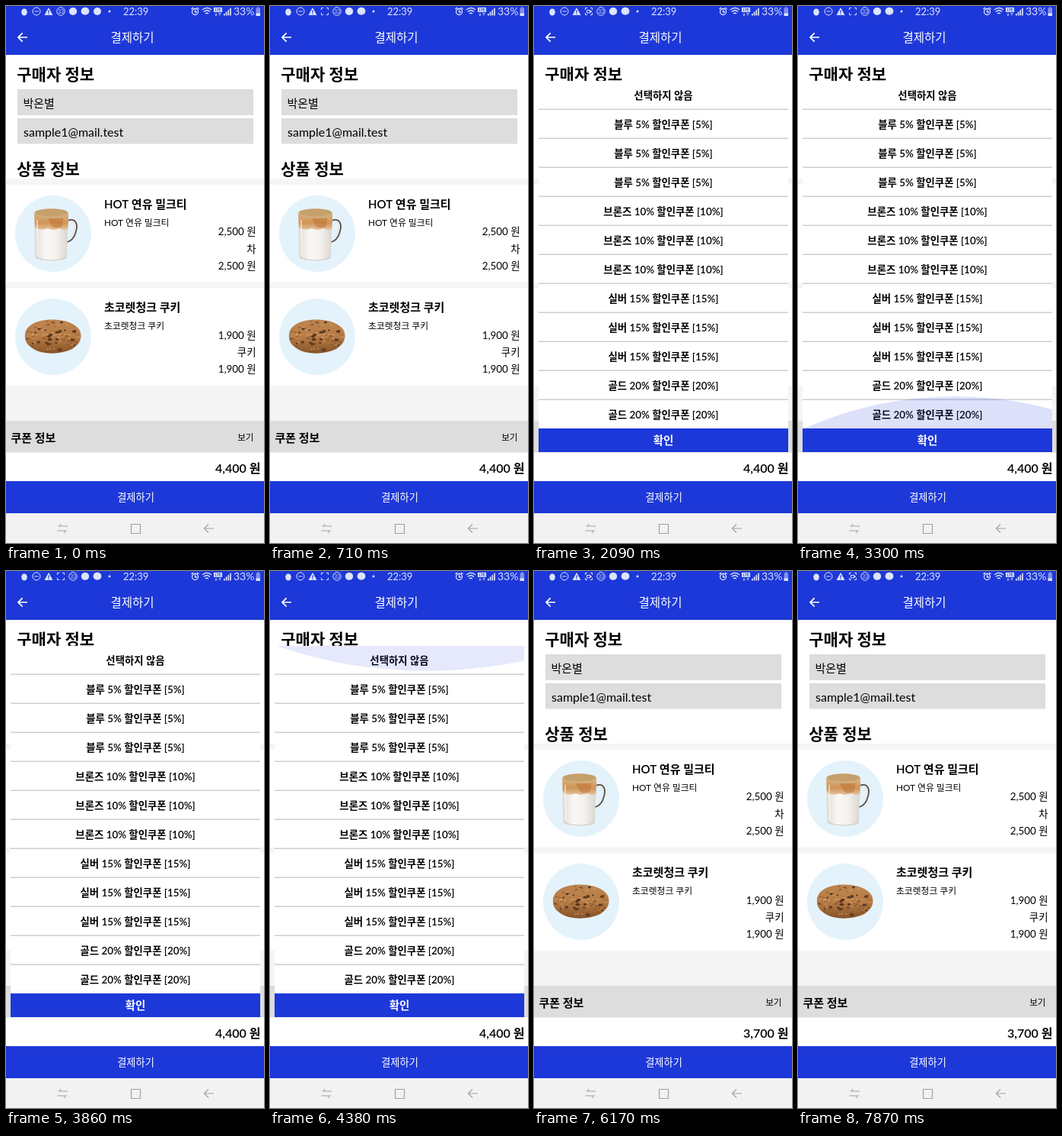
Write an HTML page with a canvas that moves like this. It is 339 by 703 pixels and loops after 8 s.

```html
<!DOCTYPE html>
<html lang="ko">
<head>
<meta charset="utf-8">
<style>
html, body { margin: 0; width: 100%; height: 100%; overflow: hidden; background: #fff; }
canvas { display: block; width: 339px; height: 703px; }
</style>
</head>
<body>
<canvas id="stage" width="339" height="703"></canvas>
<script>
const ctx = document.getElementById('stage').getContext('2d');
const LOOP = 8000;
const BLUE = '#1d38d8', STATUS = '#dde4ff', GREY = '#dddddd', PALE = '#f5f5f5';
const FONT = 'Lato, "Noto Sans CJK KR", "Noto Sans CJK", sans-serif';
const MODAL = { x: 6, y: 98, w: 328, h: 455, open: 2090, close: 5030 };
const COUPONS = ['선택하지 않음',
  ...Array(3).fill('블루 5% 할인쿠폰 [5%]'),
  ...Array(3).fill('브론즈 10% 할인쿠폰 [10%]'),
  ...Array(3).fill('실버 15% 할인쿠폰 [15%]'),
  ...Array(2).fill('골드 20% 할인쿠폰 [20%]')];

const clamp = v => Math.max(0, Math.min(1, v));
const easeOut = v => 1 - (1 - clamp(v)) ** 2;

function rect(x, y, w, h, color) {
  ctx.fillStyle = color;
  ctx.fillRect(x, y, w, h);
}

function ellipse(x, y, rx, ry, color) {
  ctx.fillStyle = color;
  ctx.beginPath();
  ctx.ellipse(x, y, rx, ry, 0, 0, Math.PI * 2);
  ctx.fill();
}

function path(d, color, width = 1) {
  ctx.strokeStyle = color;
  ctx.lineWidth = width;
  ctx.stroke(new Path2D(d));
}

function shape(d, color) {
  ctx.fillStyle = color;
  ctx.fill(new Path2D(d));
}

// y is the visual middle of the line
function text(str, x, y, size, { weight = 400, align = 'left', color = '#000' } = {}) {
  ctx.font = `${weight} ${size}px ${FONT}`;
  ctx.textAlign = align;
  ctx.fillStyle = color;
  ctx.fillText(str, x, y + size * 0.37);
}

function gradient(x0, y0, x1, y1, ...colors) {
  const g = ctx.createLinearGradient(x0, y0, x1, y1);
  colors.forEach((c, i) => g.addColorStop(i / (colors.length - 1), c));
  return g;
}

function recording(t) {
  return (t >= 1790 && t < 2810) || (t >= 5800 && t < 6760) || t >= 7770;
}

function statusBar(t) {
  const shift = 16 * easeOut((t - 320) / 220);
  const arrived = shift / 16;
  ellipse(24, 8, 3.8, 4.6, STATUS);
  path('M35 7a5 5 0 1 0 10 0a5 5 0 1 0-10 0M37.5 7h5', STATUS);
  shape('M56 2L61.5 12H50.5Z', STATUS);
  rect(55.4, 5.5, 1.2, 3.5, BLUE);
  rect(55.4, 9.8, 1.2, 1.2, BLUE);

  ctx.globalAlpha = arrived;
  path('M67.5 5V2.5H70M74 2.5H76.5V5M76.5 9V11.5H74M70 11.5H67.5V9', STATUS);
  if (recording(t)) {
    path('M69.5 5.5H73.5V9H69.5Z', STATUS);
    rect(74, 6, 1.5, 2.5, STATUS);
  }
  ctx.globalAlpha = 1 - arrived;
  ellipse(120, 7, 5, 5, STATUS);
  ctx.globalAlpha = 1;

  ctx.save();
  ctx.translate(shift, 0);
  path('M66.7 7a5.3 5.3 0 1 0 10.6 0a5.3 5.3 0 1 0-10.6 0', STATUS, 0.9);
  text('33', 72, 7, 7, { align: 'center', color: STATUS });
  ellipse(88, 7, 5.2, 5, STATUS);
  ellipse(104, 6.7, 5.4, 5, STATUS);
  ctx.restore();
  ellipse(136, 7, 1.5, 1.5, STATUS);
  text('22:39', 154, 7, 13, { color: STATUS });

  path('M244.5 7.5a4 4 0 1 0 8 0a4 4 0 1 0-8 0M248.5 5V8H251M243.5 4L246 2M253.5 4L251 2', STATUS, 1.3);
  path('M258 5Q264 0 270 5M260 7.5Q264 4 268 7.5M262 10Q264 8.5 266 10', STATUS, 1.3);
  rect(273, 2, 11, 6, STATUS);
  text('LTE', 278.5, 5, 5, { weight: 700, align: 'center', color: BLUE });
  path('M276 9V12.5M274.5 11L276 12.5L277.5 11M281 12.5V9M279.5 10.5L281 9L282.5 10.5', STATUS, 0.8);
  for (let i = 0; i < 4; i++) rect(286 + i * 2.7, 10 - i * 2.4, 1.7, 2.5 + i * 2.4, STATUS);
  text('33%', 299, 7, 14, { color: STATUS });
  rect(328.5, 2.5, 5.5, 10.5, '#8291e8');
  rect(330, 1.2, 2.5, 1.5, '#8291e8');
  rect(328.5, 9.5, 5.5, 3.5, STATUS);
}

function header(t) {
  rect(0, 0, 339, 64, BLUE);
  statusBar(t);
  path('M28 41H16M21.7 35.3L16 41L21.7 46.7', '#fff', 1.7);
  text('결제하기', 166, 41, 15.5, { weight: 500, align: 'center', color: '#fff' });
}

function mug() {
  ellipse(62, 298, 50, 50, '#e4f3fb');
  path('M81 281C91 277 95 285 92 295C90 303 86 308 80 309', '#5c4b45', 1.8);
  path('M82 283C89 281 92 287 89 295C87 301 85 305 81 306', '#d7e2e6', 0.8);
  const glass = 'M37 271Q37 265 59.5 265Q82 265 82 271L80 328Q79 334 59.5 334Q39 334 38 328Z';
  shape(glass, gradient(37, 0, 82, 0, '#dedbd6', '#faf8f4', '#f3f0eb', '#d8d4cf'));
  shape('M37 272H82L81.5 291Q77 295 70 291Q62 295 55 291Q45 295 38 290Z',
    gradient(0, 274, 0, 294, '#d9ad78', '#cf9458', '#e6c9a5'));
  shape('M55 278H75Q76 292 68 290Q60 293 55 278Z', 'rgba(190,112,48,.5)');
  ellipse(59.5, 271.5, 22.3, 6.3, '#cfae7d');
  ellipse(59.5, 270.5, 20.8, 5, '#c5a06b');
  path('M41 280L42 326', 'rgba(255,255,255,.65)', 1.5);
  path('M39 329Q48 333 59.5 333Q72 333 80 329', '#c9c8c5', 1);
}

function cookie() {
  ellipse(62, 433, 50, 50, '#e4f3fb');
  const dough = 'M25 431C25 421 35 413 52 411C72 409 91 414 97 425C101 434 97 443 87 449C73 456 49 457 36 449C28 444 24 438 25 431Z';
  shape(dough, gradient(0, 411, 0, 456, '#bd8550', '#b67b45', '#825026'));
  ctx.save();
  ctx.clip(new Path2D(dough));
  let seed = 17;
  const random = () => (seed = seed * 16807 % 2147483647) / 2147483647;
  for (let i = 0; i < 100; i++) {
    const a = random() * Math.PI * 2, r = Math.sqrt(random());
    const color = i < 75 ? (i % 2 ? 'rgba(225,174,116,.45)' : 'rgba(107,62,27,.4)') : '#593620';
    const size = i < 75 ? 1.3 : 0.9 + random() * 1.5;
    ellipse(61.5 + 36 * r * Math.cos(a), 432 + 20 * r * Math.sin(a), size * 1.3, size * 0.8, color);
  }
  ctx.restore();
}

function product(y, name, kind, price, picture) {
  picture();
  text(name, 129, y, 15, { weight: 600 });
  text(name, 129, y + 24.5, 11.8);
  [price, kind, price].forEach((s, i) =>
    text(s, 328.5, y + 36.5 + i * 22.2, 13.4, { align: 'right' }));
}

function page(t) {
  rect(0, 0, 339, 703, '#fff');
  text('구매자 정보', 14.3, 89, 21, { weight: 600 });
  rect(15, 109, 310, 34, GREY);
  rect(15, 147, 310, 33.5, GREY);
  text('박온별', 22.5, 127.5, 15);
  text('sample1@mail.test', 23, 165, 16);
  text('상품 정보', 14.3, 213.5, 21, { weight: 600 });
  rect(0, 226, 339, 8, PALE);
  rect(0, 361.5, 339, 8, PALE);
  rect(0, 497, 339, 46, PALE);
  product(259, 'HOT 연유 밀크티', '차', '2,500 원', mug);
  product(394.5, '초코렛청크 쿠키', '쿠키', '1,900 원', cookie);
  rect(0, 543, 339, 41.5, GREY);
  text('쿠폰 정보', 6.4, 565.5, 15, { weight: 600 });
  text('보기', 325.5, 565, 11.6, { align: 'right' });
  text(t < MODAL.close ? '4,400 원' : '3,700 원', 334.5, 605, 16, { weight: 600, align: 'right' });
  rect(0, 622, 339, 42, BLUE);
  text('결제하기', 170.5, 643, 13.2, { align: 'center', color: '#fff' });
}

// Overscroll glow: a flattened arc that swells, then recedes
function glow(t, start, peak, end, height, alpha, atBottom) {
  if (t < start || t >= end) return;
  const level = t < peak ? easeOut((t - start) / (peak - start)) : 1 - easeOut((t - peak) / (end - peak));
  const radius = 394, depth = 52.7;
  const scale = Math.min(1, height * level / depth);
  ctx.save();
  ctx.beginPath();
  ctx.rect(MODAL.x, MODAL.y, MODAL.w, MODAL.h);
  ctx.clip();
  ctx.globalAlpha = alpha * level;
  ctx.translate(206, atBottom ? MODAL.y + MODAL.h : MODAL.y);
  ctx.scale(1, atBottom ? -scale : scale);
  ellipse(0, depth - radius, radius, radius, BLUE);
  ctx.restore();
}

function couponList(t) {
  rect(MODAL.x, MODAL.y, MODAL.w, MODAL.h, '#fff');
  COUPONS.forEach((name, i) => {
    const y = 117.5 + i * 38;
    text(name, 170, y, 13.4, { weight: 600, align: 'center' });
    if (i < COUPONS.length - 1) rect(MODAL.x, y + 17, MODAL.w, 1.5, '#cecece');
  });
  glow(t, 3200, 3310, 3910, 42, 0.155, true);
  glow(t, 4010, 4180, 4780, 74, 0.25, false);
  rect(MODAL.x, 553, MODAL.w, 31, BLUE);
  text('확인', 170, 568.5, 14.5, { weight: 600, align: 'center', color: '#fff' });
}

function navBar() {
  rect(0, 664, 339, 39, '#f2f2f2');
  path('M81 681H68.5M71.5 678V681M67.5 687H80M77 687V690', '#a2a2a2', 1.2);
  path('M164.5 678.5H176.5V690.5H164.5Z', '#a2a2a2', 1.2);
  path('M273 684H260.5M266 678.5L260.5 684L266 689.5', '#a2a2a2', 1.2);
}

function draw(t) {
  page(t);
  if (t >= MODAL.open && t < MODAL.close) couponList(t);
  header(t);
  navBar();
}

const began = performance.now();
function tick() {
  draw((performance.now() - began) % LOOP);
  requestAnimationFrame(tick);
}
tick();
</script>
</body>
</html>
```
